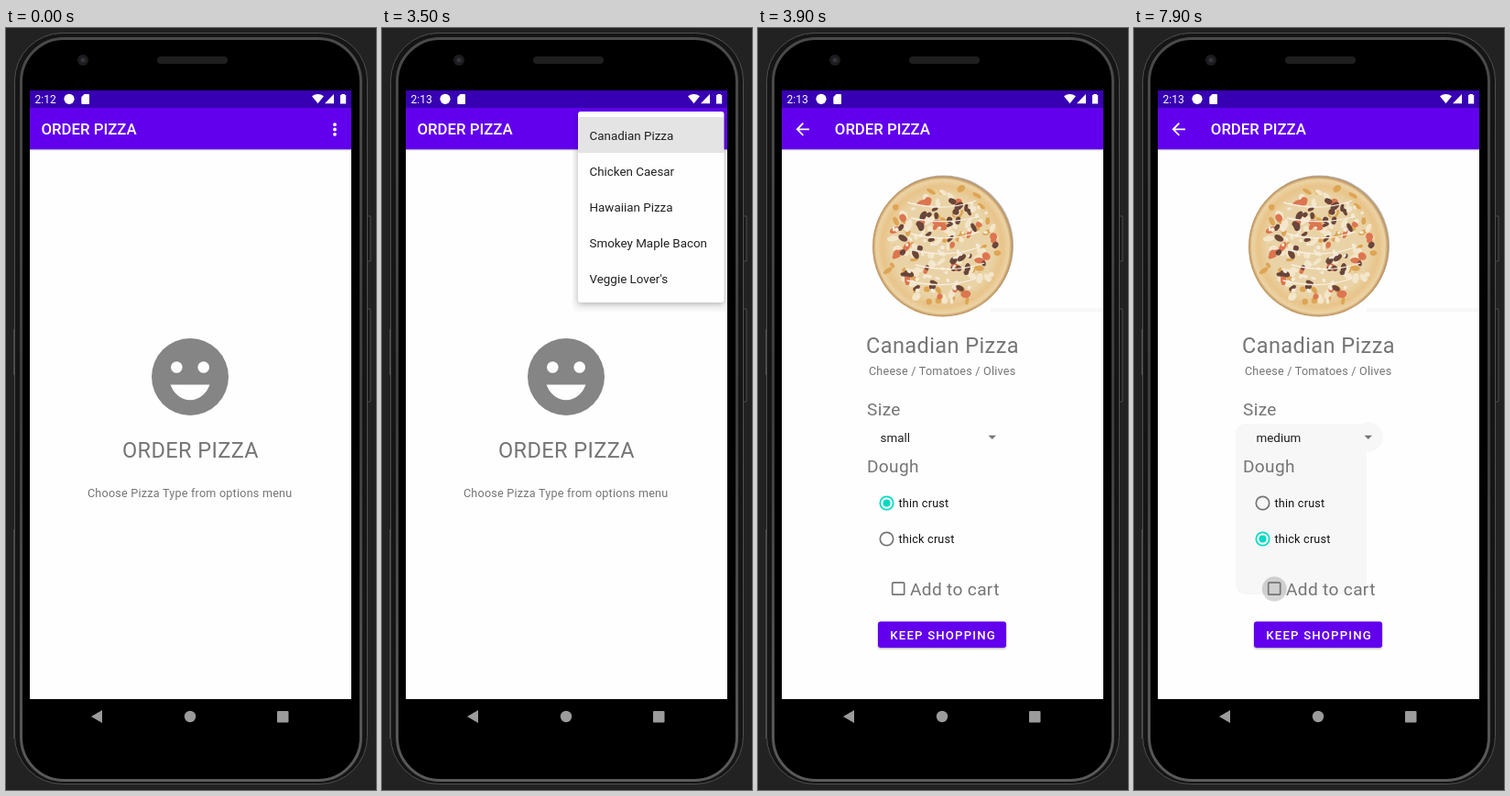
Animation of 404 by 830 pixels, one loop 8000 ms. Source, as an HTML page:

```html
<!DOCTYPE html>
<html lang="en">
<head>
<meta charset="utf-8">
<title>Order pizza</title>
<style>
html, body { margin: 0; height: 100%; overflow: hidden; background: #222; }
svg { display: block; width: 404px; height: 830px; font-family: Roboto, sans-serif; }
.bar { font-size: 16.8px; font-weight: 500; fill: #fff; }
.head { font-size: 23.5px; }
.sub { font-size: 19.1px; }
.body { font-size: 12.6px; }
.head, .sub, .body { fill: #757575; letter-spacing: .0178em; }
.item { font-size: 13.4px; fill: #212121; }
.dark { fill: #111; }
.button { font-size: 13.2px; font-weight: 500; fill: #fff; letter-spacing: .0892em; }
.popup { filter: drop-shadow(0 2px 3px rgba(0, 0, 0, .28)); }
.line { fill: none; stroke: #757575; stroke-width: 1.7; }
</style>
</head>
<body>
<svg viewBox="0 0 404 830">
  <defs>
    <linearGradient id="rim" x2="0" y2="1">
      <stop offset="0" stop-color="#4a4a4a"/>
      <stop offset=".5" stop-color="#3c3c3c"/>
      <stop offset="1" stop-color="#5a5a5a"/>
    </linearGradient>
    <radialGradient id="crust">
      <stop offset=".72" stop-color="#e9d3a6"/>
      <stop offset=".86" stop-color="#e8c48a"/>
      <stop offset=".95" stop-color="#ecd3a4"/>
      <stop offset="1" stop-color="#b98a52"/>
    </radialGradient>
    <clipPath id="screen"><path d="M26 68H377V731H26z"/></clipPath>
  </defs>

  <!-- phone -->
  <path d="M394 205h4v49h-4zM394 306h4v101h-4z" fill="#1a1a1a" stroke="#4a4a4a"/>
  <path d="M8.500 328v50M8.500 546v228" stroke="#484848"/>
  <rect x="9.500" y="5.500" width="385" height="818" rx="52" fill="#151515" stroke="#505050"/>
  <rect x="16.500" y="11.500" width="371" height="808" rx="47" stroke="url(#rim)" stroke-width="3"/>
  <circle cx="84" cy="35" r="6" fill="#1d1d20"/>
  <circle cx="84" cy="35" r="2.500" fill="#34343e"/>
  <rect x="165" y="31" width="77" height="8" rx="4" fill="#1f1f1f"/>
  <g fill="#9b9b9b">
    <path d="M93 750L105 743V757z"/>
    <circle cx="201" cy="750" r="6.200"/>
    <rect x="296" y="744" width="12.500" height="12.500" rx="1"/>
  </g>
  <path d="M26 68H377V92H26z" fill="#3700b3"/>

  <!-- first screen -->
  <g id="home">
    <path d="M26 87H377V132.500H26z" fill="#6200ee"/>
    <path d="M26 132.500H377V731H26z" fill="#fefefe"/>
    <path d="M26 133H377" stroke="#ddd"/>
    <text class="bar" x="38.500" y="116.300">ORDER PIZZA</text>
    <circle id="menuRipple" cx="358.500" cy="110.500" r="14.500" fill="#fff" fill-opacity=".22"/>
    <g fill="#fff">
      <circle cx="359" cy="105.200" r="1.900"/><circle cx="359" cy="110.500" r="1.900"/><circle cx="359" cy="115.800" r="1.900"/>
    </g>
    <g transform="translate(201 380) scale(4.200) translate(-12 -12)">
      <circle cx="12" cy="12" r="10" fill="#858585"/>
      <g fill="#fefefe">
        <circle cx="8.500" cy="9.500" r="1.500"/><circle cx="15.500" cy="9.500" r="1.500"/>
        <path d="M6.890 14H17.110C16.310 16.300 14.330 18 12 18S7.690 16.300 6.890 14z"/>
      </g>
    </g>
    <text class="head" x="201.500" y="468" text-anchor="middle">ORDER PIZZA</text>
    <text class="body" x="200.700" y="510.700" text-anchor="middle">Choose Pizza Type from options menu</text>
    <path id="menuShade" d="M208 133H377V309H214Q208 309 208 303z" fill-opacity=".025"/>
    <g id="menu" class="popup">
      <rect x="214" y="91" width="159.500" height="208" rx="3" fill="#fefefe"/>
      <path id="menuPress" d="M214 97H373.500V136H214z"/>
    </g>
  </g>

  <!-- second screen -->
  <path id="edges" d="M26.500 120V745M376.500 120V745" stroke="#e4e4e4"/>
  <g id="detail">
    <path d="M26 87H377V132.500H26z" fill="#6200ee"/>
    <path d="M26 132.500H377V731H26z" fill="#fefefe"/>
    <path d="M26 133H377" stroke="#ddd"/>
    <path d="M20 11H7.830L13.420 5.410 12 4 4 12 12 20 13.410 18.590 7.830 13H20z" fill="#fff"
      transform="translate(48.700 110.300) scale(.9) translate(-12 -12)"/>
    <text class="bar" x="83.800" y="116.300">ORDER PIZZA</text>
    <path d="M254 307.500H376" stroke="#f7f7f7" stroke-width="4"/>
    <g id="pizza">
      <circle cx="202.500" cy="237" r="76.500" fill="#b5b2ae"/>
      <circle cx="201.500" cy="238" r="76.500" fill="url(#crust)"/>
    </g>
    <text class="head" x="201.500" y="354" text-anchor="middle">Canadian Pizza</text>
    <text class="body" x="201.200" y="377.600" text-anchor="middle">Cheese / Tomatoes / Olives</text>
    <g id="shade" fill="#f7f7f7">
      <rect x="111" y="431" width="143" height="186" rx="11"/>
      <circle cx="256" cy="445.500" r="16"/>
    </g>
    <circle id="sizeRipple" cx="256" cy="445.500" r="16"/>
    <text class="sub" x="119" y="422">Size</text>
    <text id="size" class="item" x="133.500" y="450.600"></text>
    <path d="M251.500 443.800h8.500l-4.250 4.300z" fill="#757575"/>
    <text class="sub" x="119" y="484.200">Dough</text>
    <circle id="doughRipple" cx="140.500" cy="556.500"/>
    <g id="radios"></g>
    <text class="body dark" x="153.500" y="522.200">thin crust</text>
    <text class="body dark" x="153.500" y="561.200">thick crust</text>
    <circle id="cartRipple" cx="153.300" cy="611" r="13.500" fill-opacity=".16"/>
    <rect class="line" x="146.700" y="604.200" width="13" height="13" rx="1"/>
    <text class="sub" x="166" y="617.800">Add to cart</text>
    <rect x="131" y="646.500" width="140" height="28.500" rx="3" fill="#6200ee"
      style="filter: drop-shadow(0 1px 1px rgba(0,0,0,.35))"/>
    <text class="button" x="144.300" y="666.100">KEEP SHOPPING</text>
    <g id="sizes" class="popup">
      <rect x="127" y="436" width="110" height="156" rx="2" fill="#fefefe"/>
      <path d="M127 566H237V592H127z" fill="#f7f7f7"/>
      <path id="sizePress" d="M127 475H237V514H127z" fill-opacity=".1"/>
    </g>
  </g>

  <!-- status bar -->
  <g fill="#fff" clip-path="url(#screen)">
    <text id="clock" x="31.500" y="81.700" font-size="12"></text>
    <circle cx="69" cy="77.300" r="5.600"/>
    <path d="M85.500 72H90Q91 72 91 73V82Q91 83 90 83H83.300Q82.300 83 82.300 82V75.200z"/>
    <path d="M334 74.300Q340.500 69.800 347 74.300L340.500 82.300z"/>
    <path d="M348 82.300L358 72V82.300z"/>
    <path d="M366.300 73V72h3.600v1h1.300v9.500h-6.200V73z"/>
  </g>
</svg>
<script>
const LOOP = 8000;
const $ = id => document.getElementById(id);
const set = (id, attrs) => { for (const k in attrs) $(id).setAttribute(k, attrs[k]); };
const show = (id, on) => { $(id).style.display = on ? '' : 'none'; };
const add = (id, markup) => $(id).insertAdjacentHTML('beforeend', markup);
// value of the step list at time t, one step per 100 ms
const step = (t, start, list) => list[Math.max(0, Math.min(list.length - 1, (t - start) / 100))];

const addItems = (id, x, y, names) => names.forEach((name, i) =>
  add(id, `<text class="item" x="${x}" y="${y + 39 * i}">${name}</text>`));

addItems('menu', 226.5, 122.2,
  ['Canadian Pizza', 'Chicken Caesar', 'Hawaiian Pizza', 'Smokey Maple Bacon', "Veggie Lover's"]);
addItems('sizes', 133.5, 460.4, ['small', 'medium', 'large', 'xlarge']);

for (const y of [517.5, 556.5]) {
  add('radios', `<g><circle class="line" cx="140.5" cy="${y}" r="7.2"/>
    <circle cx="140.5" cy="${y}" r="4" fill="#03dac5"/></g>`);
}

function bakePizza() {
  let seed = 11;
  const rand = () => (seed = seed * 16807 % 2147483647) / 2147483647;
  const scatter = (count, color, size, reach) => {
    for (let i = 0; i < count; i++) {
      const a = rand() * 2 * Math.PI, d = Math.sqrt(rand()) * reach;
      const x = 201.5 + d * Math.cos(a), y = 238 + d * Math.sin(a);
      add('pizza', `<ellipse cx="${x}" cy="${y}" rx="${size * (.6 + rand())}" ry="${size * (.5 + rand() * .5)}"
        fill="${color}" transform="rotate(${rand() * 180} ${x} ${y})"/>`);
    }
  };
  scatter(45, '#dda554', 3.5, 68);
  scatter(60, '#f3e6ca', 4, 62);
  scatter(26, '#dc7550', 4.5, 58);
  scatter(42, '#69453a', 3.6, 58);
  scatter(45, '#f4ead8', 2.4, 60);
  for (let y = 190; y < 290; y += 17) {
    add('pizza', `<path d="M${160 + rand() * 15} ${y}q40 ${6 + rand() * 6} 75 -2" fill="none"
      stroke="#f8eee2" stroke-width="1.3"/>`);
  }
}
bakePizza();

function setRadio(i, on) {
  const [ring, dot] = $('radios').children[i].children;
  ring.style.stroke = on ? '#03dac5' : '#757575';
  dot.style.display = on ? '' : 'none';
}

function draw(time) {
  const t = Math.floor(time % LOOP / 100) * 100;
  $('clock').textContent = t < 500 ? '2:12' : '2:13';

  show('home', t < 3700);
  show('menuRipple', t >= 2300 && t < 2600);
  show('menu', t >= 2400);
  show('menuShade', t >= 2500);
  set('menu', t < 2500 ? { opacity: .7, transform: 'translate(7 -11)' } : { opacity: 1, transform: '' });
  set('menuPress', { 'fill-opacity': step(t, 3200, [0, .04, .08, .1]) });

  const scale = step(t, 3600, [.95, .991, .998, 1]);
  show('detail', t >= 3600);
  show('edges', t === 3700);
  set('detail', {
    opacity: t < 3700 ? .7 : 1,
    transform: `translate(201.5 409.5) scale(${scale}) translate(-201.5 -409.5)`
  });

  show('shade', t >= 5200);
  set('sizeRipple', { 'fill-opacity': step(t, 5000, [0, .1, .08, .03, .03, .03, .03, .03, .03, .03, .03, .03, .03, 0]) });
  show('sizes', t >= 5200 && t < 6400);
  set('sizes', { opacity: t < 5300 ? .6 : t < 6300 ? .965 : .4 });
  show('sizePress', t >= 6200);
  $('size').textContent = t < 6300 ? 'small' : 'medium';

  set('doughRipple', {
    r: step(t, 6900, [0, 9, 13, 15]),
    'fill-opacity': step(t, 6900, [0, .1, .15, .15, .11, .06, 0])
  });
  setRadio(0, t < 7100);
  setRadio(1, t >= 7100);
  show('cartRipple', t >= 7900);
}

let start;
function tick(now) {
  start ??= now;
  draw(now - start);
  requestAnimationFrame(tick);
}
draw(0);
requestAnimationFrame(tick);
</script>
</body>
</html>
```
